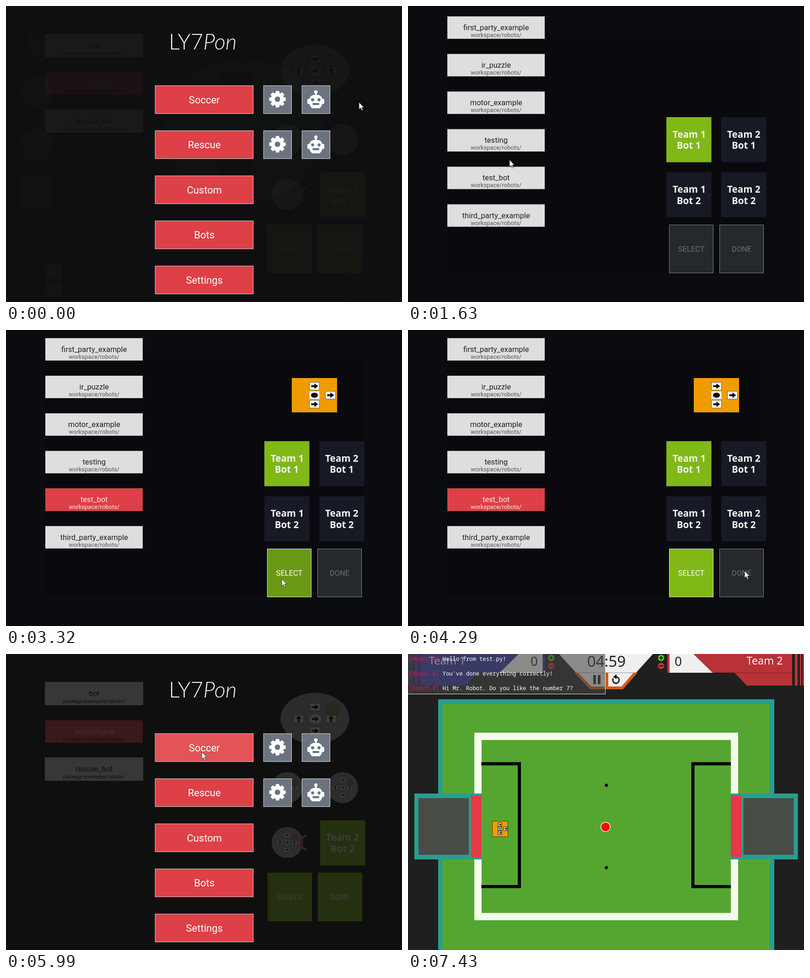
Animation, 866 px wide and 647 px high, one loop 8000 ms. Source, as an HTML page:

```html
<!DOCTYPE html>
<html lang="en">
<head>
<meta charset="utf-8">
<title>Robot simulator menu</title>
<style>
html, body { margin: 0; width: 100%; height: 100%; overflow: hidden; background: #0f0f10; }
svg { display: block; width: 866px; height: 647px; }
text { font-family: Roboto, Arial, sans-serif; white-space: pre; }
.mid { text-anchor: middle; }
.noto { font-family: "Noto Sans", "Open Sans", sans-serif; }
.mono { font-family: "Noto Sans Mono", "DejaVu Sans Mono", monospace; }
.title { font-family: Lato, Inter, sans-serif; font-weight: 300; }

.cursor { animation: cursor 8s infinite; }
@keyframes cursor {
  0%, 0.375% { transform: translate(772px, 210.5px); animation-timing-function: ease-in-out; }
  5.25%, 7.75% { transform: translate(678px, 209px); animation-timing-function: ease-in; }
  11.625% { transform: translate(467px, 304px); animation-timing-function: ease-out; }
  17.5%, 20% { transform: translate(222px, 336px); animation-timing-function: ease-in-out; }
  26.75%, 31.25% { transform: translate(197px, 357px); animation-timing-function: ease-in-out; }
  40.25%, 47.875% { transform: translate(603px, 544px); animation-timing-function: ease-in-out; }
  53.625%, 66.75% { transform: translate(736px, 526.5px); animation-timing-function: ease-in-out; }
  74.875%, 82.75% { transform: translate(428px, 214px); animation-timing-function: ease-in; }
  89.375%, 100% { transform: translate(428px, 660px); }
}
.scroll { animation: scroll 8s infinite; }
@keyframes scroll {
  0%, 17.875% { transform: translateY(0); animation-timing-function: ease-out; }
  21.5%, 100% { transform: translateY(-36px); }
}
.ghost { animation: ghost 8s linear infinite; }
@keyframes ghost {
  0%, 7.74% { opacity: .05; }
  7.75%, 66.75% { opacity: .12; }
  75%, 100% { opacity: .2; }
}
</style>
</head>
<body>
<script>
const LOOP = 8000;
const RED = '#dd4046', GREEN = '#80b818', TEAL = '#2a9d8f', ORANGE = '#f09c00';
let css = '', count = 0;

// group visible only from start to end (ms), with hard cuts
function during(start, end, body) {
  const name = 'w' + count++;
  const key = (ms, o) => `${ms / LOOP * 100}%{opacity:${o}}`;
  css += `@keyframes ${name}{${start ? key(0, 0) : ''}${key(start, 1)}${end < LOOP ? key(end, 0) : ''}100%{opacity:${end < LOOP ? 0 : 1}}}
.${name}{animation:${name} ${LOOP}ms step-end infinite}`;
  return `<g class="${name}">${body}</g>`;
}
const rect = (x, y, w, h, fill, extra = '') =>
  `<rect x="${x}" y="${y}" width="${w}" height="${h}" fill="${fill}" ${extra}/>`;
const framed = (x, y, w, h, fill, line) =>
  rect(x + .5, y + .5, w - 1, h - 1, fill, `stroke="${line}"`);
const disc = (x, y, r, fill, extra = '') =>
  `<circle cx="${x}" cy="${y}" r="${r}" fill="${fill}" ${extra}/>`;
const oval = (x, y, rx, ry, fill) =>
  `<ellipse cx="${x}" cy="${y}" rx="${rx}" ry="${ry}" fill="${fill}"/>`;
const poly = (points, fill) => `<polygon points="${points}" fill="${fill}"/>`;
const path = (d, extra) => `<path d="${d}" ${extra}/>`;
const text = (x, y, size, fill, s, cls = 'mid', extra = '') =>
  `<text x="${x}" y="${y}" font-size="${size}" fill="${fill}" class="${cls}" ${extra}>${s}</text>`;
const at = (x, y, body, more = '') => `<g transform="translate(${x} ${y}) ${more}">${body}</g>`;

// sensor plate with an arrow
const plate = (x, y, scale = 1, turn = 0) => at(x, y,
  rect(-11, -8.5, 22, 17, '#f4f4f4', 'stroke="#333" stroke-width=".7"') +
  `<g transform="rotate(${turn})">${poly('-7,-2 0,-2 0,-6 8,0 0,6 0,2 -7,2', '#080808')}</g>`,
  `scale(${scale})`);

/* ---- menu ---- */
const GRAY = '#6b747e';
const rowY = i => 173.6 + i * 98.55;
const gear = (x, y) => {
  let teeth = '';
  for (let a = 0; a < 360; a += 45)
    teeth += `<g transform="rotate(${a})">${poly('-4.8,-12 -3.4,-18 3.4,-18 4.8,-12', '#fff')}</g>`;
  return at(x, y, teeth + disc(0, 0, 10, 'none', 'stroke="#fff" stroke-width="8"'));
};
const robotIcon = (x, y, back) => at(x, y,
  disc(0, -16.5, 3.7, '#fff') + rect(-1.8, -15, 3.6, 8, '#fff') +
  rect(-18.5, -1.5, 37, 11, '#fff', 'rx="2.5"') +
  path('M-6 -10H6Q13.5 -8 14 0V10Q12 16 8 19H-8Q-12 16 -14 10V0Q-13.5 -8 -6 -10Z', 'fill="#fff"') +
  disc(-7, .5, 3.4, back) + disc(7, .5, 3.4, back) +
  rect(-7.5, 7.5, 15, 4.6, back, 'rx="2.3"'));
const menuButton = (y, label, fill = RED, line = '#ece4e4') =>
  framed(325.8, y, 215.4, 62, fill, line) + text(433.7, y + 39.2, 22, '#fff', label);
const robotButton = (y, back) =>
  framed(646.8, y, 62.2, 62, back, '#e4e6e8') + robotIcon(677.6, y + 30.9, back);
const tools = y => framed(562.8, y, 62.2, 62, GRAY, '#e4e6e8') + gear(593.7, y + 30.1) + robotButton(y, GRAY);

/* ---- bot picker ---- */
const item = (y, name, dir, fill = '#dedede', ink = '#1c2026', sub = '#555', line, subSize = 13) =>
  (line ? framed(85, y - 1, 215, 51, fill, line) : rect(86, y, 213, 49, fill)) +
  text(192.7, y + 30, 16.5, ink, name) + text(192.7, y + 45, subSize, sub, dir);
const tile = (col, row, fill, label = true) => {
  const x = 565 + col * 120.3, y = 243 + row * 120.4;
  const mid = x + 50, font = 'mid noto', bold = 'font-weight="600"';
  return rect(x, y, 98.5, 98.5, fill) + (label
    ? text(mid - col, y + 44.7, 20.6, '#f4f4f4', 'Team ' + (col + 1), font, bold) +
      text(mid - 1, y + 69.2, 20.6, '#f4f4f4', 'Bot ' + (row + 1), font, bold) : '');
};
const bigButton = (x, label, fill, line, ink) =>
  framed(x, 478, 97, 106, fill, line) + text(x + 48.5, 537, 16.5, ink, label);
const enabled = (x, label, fill = GREEN) => bigButton(x, label, fill, '#e8f0d8', '#fff');
const disabled = (x, label) => bigButton(x, label, '#25292d', '#85888b', '#6d6f71');
const DARK = '#171a24';

// square bot: three sensors in a column, one at the front
const squareBot = (w, h) => {
  const k = w / 99;
  return rect(-w / 2, -h / 2, w, h, ORANGE) +
    plate(0, -19.7 * h / 75, k) + plate(0, 19.7 * h / 75, k) + plate(35 * k, 0, k) +
    rect(-11 * k, -8.5 * k, 22 * k, 17 * k, '#f4f4f4') + oval(0, 0, 7.5 * k, 5.5 * k, '#080808');
};

/* ---- dim leftovers behind the menu ---- */
const SHELL = '#a4a4a4', BADGE = '#8e8c58';
const roundBot = (x, y) => disc(x, y, 34, SHELL) + disc(x + 17, y - 11, 8, BADGE) +
  plate(x, y - 16, .5) + plate(x, y + 16, .5) + plate(x, y, .5) +
  plate(x - 16, y, .5, -90) + plate(x + 16, y, .5, -90);
const oldDir = 'package/examples/robots/';
const oldItem = (y, name) => item(y, name, oldDir, '#d6dcd8', '#050505', '#050505', '#d6dcd8', 11.1);
const ghost = `<g class="ghost">` +
  oldItem(62, 'bot') + oldItem(227, 'rescue_bot') +
  item(145, 'controllable', oldDir, '#f04048', '#f4c0c0', '#111', '', 11.1) +
  oval(675.5, 141, 75, 56, SHELL) + disc(714, 121, 17, BADGE) +
  plate(676, 116) + plate(676, 168) + plate(640, 142, 1, -90) + plate(711, 142, 1, -90) +
  oval(676, 142, 13, 10, '#f4f4f4') + poly('669,140 676,140 676,136 684,142 676,148 676,144 669,144', '#080808') +
  roundBot(615, 292) + roundBot(736, 292) + roundBot(615, 412) +
  path('M644 403L657 397M644 421L656 428', `stroke="${SHELL}" stroke-width="4"`) +
  rect(644, 405, 6, 15, RED) +
  at(1.6, 0, tile(1, 1, GREEN)) +
  bigButton(572, 'SELECT', GREEN, GREEN, '#fff') + bigButton(682, 'DONE', GREEN, GREEN, '#fff') + '</g>';
const faint = during(0, 620,
  rect(0, 0, 866, 647, '#0f0f11') + oval(520, 272, 175, 158, '#0f1211') +
  rect(469, 147, 70, 60, '#0e0f0f') + rect(469, 340, 70, 60, '#0e0f0f') +
  poly('48,42 84,106 48,106', '#121112') + disc(68, 188, 36, '#121112') +
  poly('68,264 104,290 91,334 45,334 32,290', '#121212') + rect(32, 372, 71, 72, '#121112') +
  rect(86, 562, 36, 34, '#131312') + rect(86, 603, 36, 33, '#131312') +
  rect(741, 558, 112, 33, '#110f10') + rect(741, 605, 112, 40, '#120f10'));

const menuBody = rect(0, 0, 866, 647, '#0f0f0f') + faint + ghost +
  text(356, 95, 47.5, '#f8f8f8', 'LY7<tspan font-style="italic">Pon</tspan>', 'title') +
  ['Soccer', 'Rescue', 'Custom', 'Bots', 'Settings']
    .map((s, i) => menuButton(rowY(i), s)).join('') +
  tools(rowY(0)) + tools(rowY(1));
const menu = during(0, 620, menuBody + during(240, 620, robotButton(rowY(0), '#7a838b'))) +
  during(5340, 6620, menuBody + during(5880, 6620, menuButton(rowY(0), 'Soccer', '#e25458', '#e8a0a2')));

const dir = 'workspace/robots/';
const names = ['button_example', 'first_party_example', 'ir_puzzle', 'motor_example',
  'testing', 'test_bot', 'third_party_example'];
const chosenY = 53.8 + 4 * 82.15;
const list = `<g clip-path="url(#view)"><g class="scroll">` +
  names.map((n, i) => item(53.8 + (i - 1) * 82.15, n, dir)).join('') +
  during(1900, 2500, item(chosenY, 'test_bot', dir, '#e6e6e6', '#1c2026', '#555', '#f4f4f4')) +
  during(2500, 2720, item(chosenY, 'test_bot', dir, '#e25458', '#15181c', '#fff', '#f0b0b0')) +
  during(2720, 5340, item(chosenY, 'test_bot', dir, RED, '#f6eaea', '#f6eaea')) + '</g></g>';
const picker = during(620, 5340,
  rect(0, 0, 866, 647, '#0b0c10') + rect(85, 61, 700, 523, '#0a0a0e') + list +
  tile(0, 0, GREEN) + tile(1, 0, DARK) + tile(0, 1, DARK) + tile(1, 1, DARK) +
  disabled(571, 'SELECT') + disabled(681, 'DONE') +
  during(2500, 5340, at(674.5, 142.5, squareBot(99, 75)) + enabled(571, 'SELECT')) +
  during(3320, 3400, enabled(571, 'SELECT', '#6a9a15')) +
  during(4440, 5340, tile(0, 0, DARK, false) + at(614.3, 292.3, squareBot(43, 43)) +
    tile(1, 0, GREEN) + enabled(681, 'DONE')) +
  during(4740, 4850, enabled(681, 'DONE', '#6a9a15')));

/* ---- match ---- */
const mirror = body => body + `<g transform="translate(866.6 0) scale(-1 1)">${body}</g>`;
const goal = rect(14, 305, 147, 144, TEAL) + rect(23, 315, 110, 124, '#474d46') +
  rect(137.5, 309.5, 23, 134.5, '#e63946') +
  path('M160.5 240H243.5V508.3H160.5', 'fill="none" stroke="#000" stroke-width="6.8"');
const field = rect(66, 99, 735, 560, TEAL) + rect(75.5, 109, 715.5, 536.5, '#55a630') +
  rect(153, 180, 561, 394, 'none', 'stroke="#f3fbee" stroke-width="16"') + mirror(goal) +
  disc(433.7, 287, 3.4, '#000') + disc(433.7, 467, 3.4, '#000') +
  disc(432, 378, 10.2, '#f00', 'stroke="#fff" stroke-width="1.2"');
const chip = (x, y) => rect(x - 4, y - 3.8, 8, 7.6, '#fff', 'stroke="#000"');
const player = rect(184.5, 365.5, 34, 34, ORANGE, 'stroke="#5a3a00"') +
  [[201, 373], [201, 391], [213, 382]].map(([x, y]) => chip(x, y) +
    path(`M${x - 2.5} ${y}h5m-2 -2l2 2l-2 2`, 'stroke="#000" stroke-width="1.4" fill="none"')).join('') +
  chip(201, 382) + disc(201, 382, 2.6, '#3a9a3a');

const teamBar = color => poly('625,0 840,0 840,41 667,41', color) +
  poly('714,41 840,41 840,69 741,69', color) +
  rect(667, 40.5, 173, 1.5, '#0004') +
  rect(846, 0, 6, 69, color) + rect(857, 0, 3, 69, color) + rect(863, 0, 3, 69, color) +
  poly('572,0 625,0 667,41 572,41', '#efefef') + rect(567, 0, 5, 41, color) +
  path('M625 0L667 41', 'stroke="#0003" stroke-width="3"');
const knob = (y, color, sign) => disc(553.5, y, 7, color) +
  path(sign, 'stroke="#111" stroke-width="2"');
const knobs = knob(8.5, '#5fc32c', 'M549 8.5H558M553.5 4V13') + knob(26, '#cf3030', 'M549 26H558');
const medium = (x, y, size, fill, s) => text(x, y, size, fill, s, 'mid noto', 'font-weight="500"');
const board = teamBar('#b93235') +
  `<g transform="translate(866.6 0) scale(-1 1)">${teamBar('#2a2a98') + knobs}</g>` + knobs +
  poly('364,41 502,41 470,77 398,77', '#d9590f') +
  poly('372,41 432,41 432,71 401,71', '#efefef') + poly('438,41 493,41 467,71 438,71', '#efefef') +
  poly('330,0 536,0 499,41 367,41', '#efefef') +
  path('M536 0L499 41H367L330 0', 'fill="none" stroke="#0003" stroke-width="2"') +
  rect(405, 46, 6, 20, '#222') + rect(415, 46, 6, 20, '#222') +
  path('M449 53A7 7 0 1 0 455 50', 'fill="none" stroke="#111" stroke-width="2.8"') +
  poly('456,44 456,55 449,50', '#111') +
  medium(434, 28, 33, '#222', '04:59') +
  medium(276, 26, 28, '#222', '0') + medium(591, 26, 28, '#222', '0') +
  medium(85.5, 23, 23.5, '#f4f4f4', 'Team 1') + medium(780, 23, 23.5, '#f4f4f4', 'Team 2');

const lines = ['Hello from test.py!', "You've done everything correctly!",
  'Hi Mr. Robot. Do you like the number 7?'];
const log = rect(0, 0, 432, 88, 'rgba(70,70,70,.59)') +
  path('M0 87.5H431.5V0', 'fill="none" stroke="#e8e8e8"') +
  lines.map((s, i) => text(2.5, 14.7 + i * 32, 12.2, '#fff',
    `<tspan fill="#e0105a">[Robot-0]</tspan> ${s}`, 'mono')).join('');
const match = during(6620, LOOP,
  rect(0, 0, 866, 647, '#1f1f1f') + field + player + board + during(7430, LOOP, log));

const pointer = `<g class="cursor">${path('M0 0V15.5L3.6 12.2L6.2 18L8.6 17L6.1 11.3H10.8Z',
  'fill="#fff" stroke="#111" stroke-width=".8"')}</g>`;

document.body.insertAdjacentHTML('beforeend',
  `<style>${css}</style><svg viewBox="0 0 866 647"><clipPath id="view"><rect width="866" height="486"/></clipPath>` +
  menu + picker + match + pointer + '</svg>');
</script>
</body>
</html>
```
